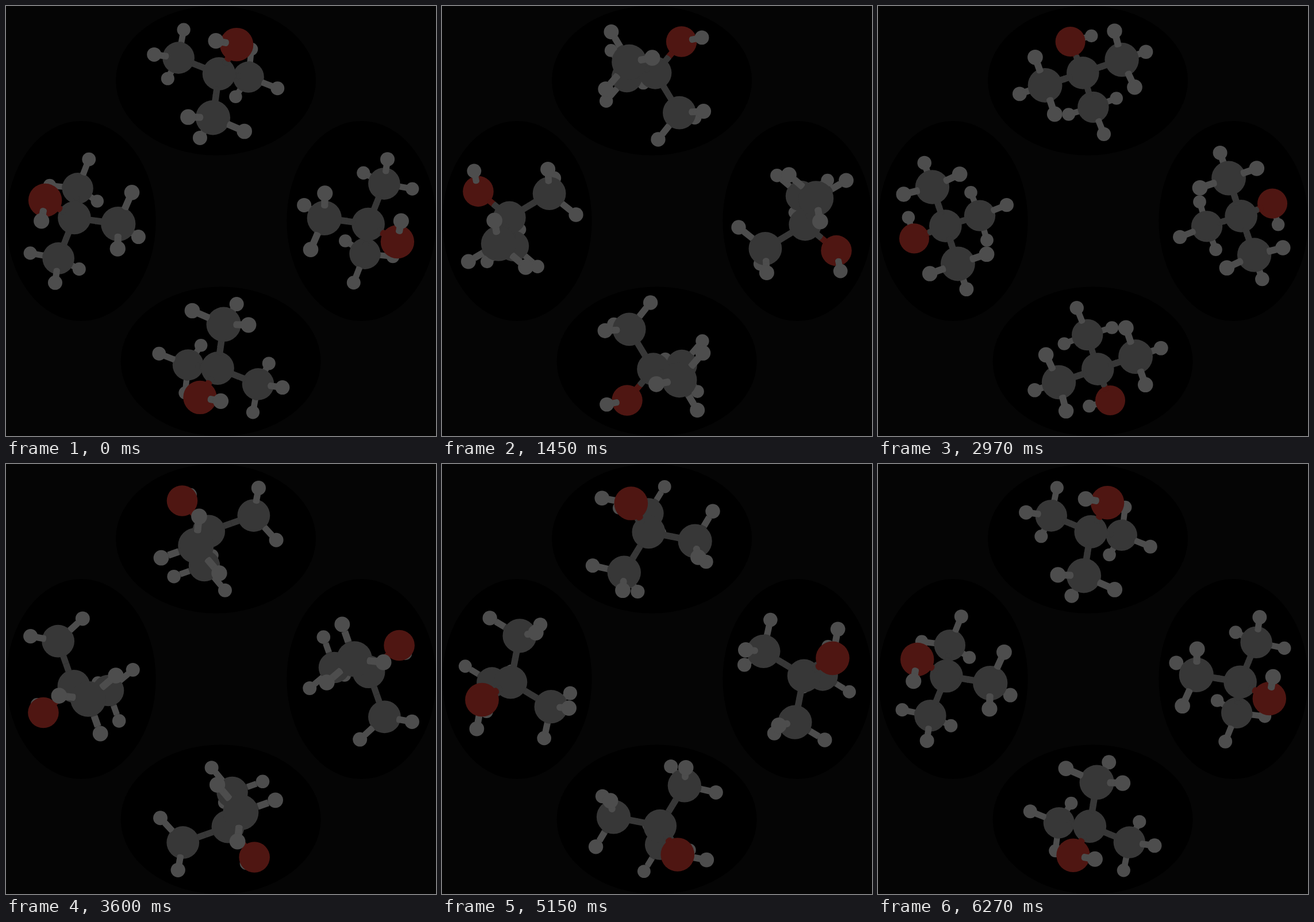
Write an HTML page with a canvas that moves like this. It is 748 px wide and 748 px high and loops after 6.3 s.

```html
<!DOCTYPE html>
<html lang="en">
<head>
<meta charset="utf-8">
<title>Rotating molecule, four views</title>
<style>
  html, body { margin: 0; width: 100%; height: 100%; overflow: hidden; background: #050505; }
  canvas { display: block; width: 748px; height: 748px; }
</style>
</head>
<body>
<canvas id="stage" width="748" height="748"></canvas>
<script>
const ctx = document.getElementById('stage').getContext('2d');

const LOOP = 6300, FRAME = 33, LAST = 190;
const CX = 363, CY = 130, DIST = 950, TILT = 0.126, ROLL = 0.0165;
const BOND = 5.6, RAD = Math.PI / 180;

const KIND = {
  C: { r: 28.6, color: '#373737' },
  O: { r: 27.6, color: '#4f1612' },
  H: { r: 12.3, color: '#4d4d4d' }
};

// The same scene turned by quarter turns: top, left, right, bottom
const VIEWS = [
  [1, 0, 0, 1, 0, 0],
  [0, -1, 1, 0, 1, 739],
  [0, 1, -1, 0, 748, 9],
  [-1, 0, 0, -1, 738.6, 748]
];

const mix = (a, b, t) => a.map((v, i) => v + (b[i] - v) * t);
const length = (a, b) => Math.hypot(...a.map((v, i) => v - b[i]));

const atoms = [], bonds = [];

function addAtom(kind, pos, parent) {
  const atom = { ...KIND[kind], pos };
  atoms.push(atom);
  if (parent) bonds.push([parent, atom]);
  return atom;
}

// Staggered hydrogen: its bond runs opposite to the bond core-other
function addHydrogen(parent, other, len) {
  const t = -len / length(core.pos, other.pos);
  addAtom('H', parent.pos.map((v, i) => v + t * (other.pos[i] - core.pos[i])), parent);
}

const core = addAtom('C', [8, -12.8, 7]);
const methyls = [
  [-65.2, -38.7, -23.4],
  [59.5, 1, -55.7],
  [-1.5, 54.6, 49.5]
].map(pos => addAtom('C', pos, core));
const oxygen = addAtom('O', [39.5, -65.4, 50.3], core);

for (const m of methyls)
  for (const other of [...methyls, oxygen])
    if (other !== m) addHydrogen(m, other, 58.5);
addHydrogen(oxygen, methyls[1], 51.5);

function spin([x, y, z], angle) {
  const c = Math.cos(angle), s = Math.sin(angle);
  return [x * c + z * s, y, z * c - x * s];
}

function project([x, y, z]) {
  const s = 1 / (1 - z / DIST);
  return {
    x: CX + s * (x + ROLL * y),
    y: CY + s * (y + TILT * z - ROLL * x),
    s
  };
}

function ball(pos, r, color) {
  const p = project(pos);
  return { z: pos[2], draw() {
    ctx.fillStyle = color;
    ctx.beginPath();
    ctx.arc(p.x, p.y, r * p.s, 0, 7);
    ctx.fill();
  } };
}

function rod(a, b, color) {
  const p = project(a), q = project(b);
  const slope = Math.abs(a[2] - b[2]) / (length(a, b) || 1);
  const w = BOND * (p.s + q.s) / 2;
  const dx = q.x - p.x, dy = q.y - p.y, len = Math.hypot(dx, dy);
  return { z: (a[2] + b[2]) / 2, draw() {
    ctx.save();
    ctx.translate(p.x, p.y);
    ctx.rotate(Math.atan2(dy, dx));
    ctx.fillStyle = color;
    ctx.fillRect(0, -w, len, 2 * w);
    for (const end of [0, len]) {
      ctx.beginPath();
      ctx.ellipse(end, 0, w * slope, w, 0, 0, 7);
      ctx.fill();
    }
    ctx.restore();
  } };
}

function buildScene(angle) {
  const parts = [];
  for (const atom of atoms) {
    atom.now = spin(atom.pos, angle);
    parts.push(ball(atom.now, atom.r, atom.color));
  }
  for (const [a, b] of bonds) {
    const len = length(a.now, b.now);
    const at = d => mix(a.now, b.now, d / len);
    parts.push(rod(at(0.98 * a.r), at(len / 2), a.color));
    parts.push(rod(at(len / 2), at(len - 0.98 * b.r), b.color));
  }
  return parts.sort((p, q) => p.z - q.z);
}

// A full turn with a slight sway in its speed
function angleAt(frame) {
  const turn = frame * 1.883;
  return (turn - 1.55 - 1.6 * Math.cos((turn - 45) * RAD)) * RAD;
}

function render(frame) {
  const parts = buildScene(angleAt(frame));
  ctx.setTransform(1, 0, 0, 1, 0, 0);
  ctx.fillStyle = '#050505';
  ctx.fillRect(0, 0, 748, 748);
  for (const view of VIEWS) {
    ctx.setTransform(...view);
    ctx.fillStyle = '#000';
    ctx.beginPath();
    ctx.ellipse(365, 129.7, 174, 130, 0, 0, 7);
    ctx.fill();
    for (const part of parts) part.draw();
  }
}

// Frames last 33 ms, with their starts rounded to 10 ms
const frameAt = ms => Math.min(LAST, Math.floor((Math.floor(ms / 10) * 10 + 4.9) / FRAME));

let start, shown = -1;
function tick(now) {
  start ??= now;
  const frame = frameAt(Math.max(0, now - start) % LOOP);
  if (frame !== shown) render(shown = frame);
  requestAnimationFrame(tick);
}
render(0);
requestAnimationFrame(tick);
</script>
</body>
</html>
```
